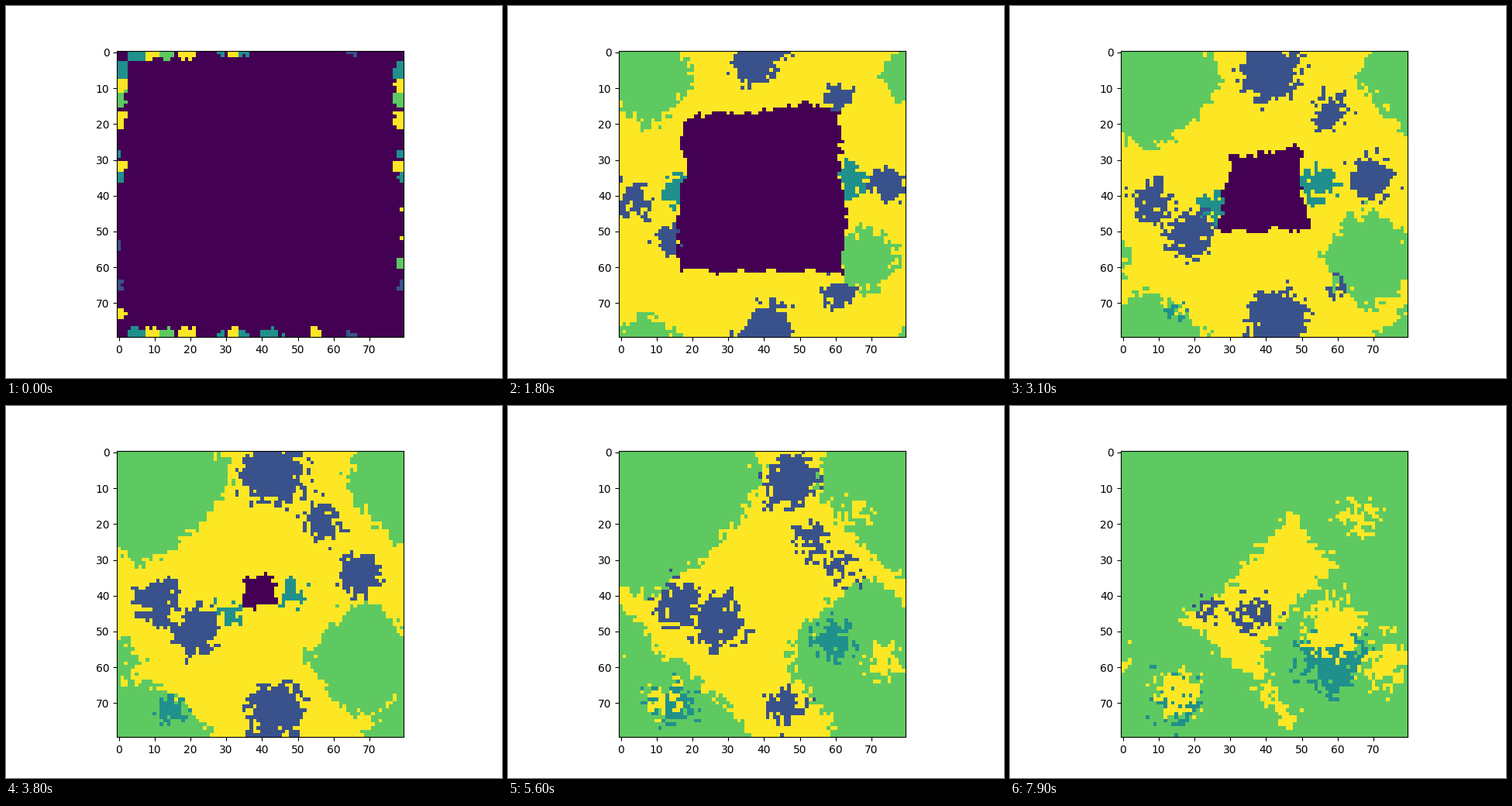
Write a matplotlib script that moves like this. It is 640 by 480 pixels and loops after 8000 ms.

```python
import numpy as np
import matplotlib.pyplot as plt
from matplotlib.animation import FuncAnimation

N, FRAMES = 80, 80
EMPTY, BLUE, TEAL, GREEN, YELLOW = range(5)
TOP, LEFT, RIGHT, BOTTOM = range(4)

rng = np.random.default_rng(7)
Y, X = np.mgrid[:N, :N]


def wrapped(d):
    """Shortest offset on a grid whose opposite edges meet."""
    return np.abs((d + N / 2) % N - N / 2)


def distance(x, y, p=2.0):
    return (wrapped(X - x) ** p + wrapped(Y - y) ** p) ** (1 / p)


def speckle():
    """White noise, slightly clumped, with unit spread."""
    w = rng.normal(size=(N, N))
    near = sum(np.roll(w, s, axis) for s in (-1, 1) for axis in (0, 1))
    n = w + 0.2 * near
    return np.clip(n / n.std(), -2.2, 2.2)


def drifting(step=6):
    """Speckle that changes slowly over the frames."""
    keys = [speckle() for _ in range(FRAMES // step + 2)]

    def at(t):
        i, u = t // step, (t % step) / step
        return ((1 - u) * keys[i] + u * keys[i + 1]) / np.hypot(u, 1 - u)
    return at


# Every side starts with the same row of colonies: colour, centre, half width.
COLONIES = [(TEAL, 5, 2), (YELLOW, 9.5, 1.5), (GREEN, 13, 2), (YELLOW, 19, 2),
            (TEAL, 28.5, 0.5), (YELLOW, 32, 1), (TEAL, 35, 1), (BLUE, 65, 1)]
STRAYS = {TOP: [],
          LEFT: [(BLUE, 54, 1), (YELLOW, 73, 1)],
          RIGHT: [(YELLOW, 44, 0), (YELLOW, 52, 0), (GREEN, 59, 1)],
          BOTTOM: [(TEAL, 42, 2), (TEAL, 46, 0.5), (YELLOW, 55, 1)]}
SPREAD = {BLUE: 1.3, TEAL: 1.1, GREEN: 0.9, YELLOW: 0.65}


def settle_border():
    """Plant the colonies; return distance to them and the nearest colour."""
    reach = np.full((N, N), np.inf)
    best = np.full((N, N), np.inf)
    owner = np.full((N, N), YELLOW)
    for side, strays in STRAYS.items():
        for color, mid, half in COLONIES + strays:
            for p in range(int(np.ceil(mid - half)), int(mid + half) + 1):
                depth = 1 + rng.integers(0, 2) + (half > 1 or color == YELLOW)
                for k in range(depth if half else 1):
                    x, y = ((p, k), (k, p), (N - 1 - k, p), (p, N - 1 - k))[side]
                    dx, dy = np.abs(X - x), np.abs(Y - y)
                    d = np.maximum(dx, dy) + 0.2 * np.minimum(dx, dy)
                    np.minimum(reach, d, out=reach)
                    owner[d * SPREAD[color] < best] = color
                    np.minimum(best, d * SPREAD[color], out=best)
    return reach, owner


# Patches that wander, swell and die: birth, death, start, end, largest radius.
PATCHES = {
    YELLOW: [(48, 100, (65, 16), (66, 20), 4),
             (40, 120, (74, 58), (73, 60), 6),
             (40, 110, (10, 71), (20, 64), 5),
             (58, 125, (60, 45), (56, 57), 9)],
    TEAL: [(8, 44, (8, 36), (36, 47), 4.5),
           (8, 43, (72, 34), (45, 39), 5),
           (26, 110, (15, 73), (14, 66), 6),
           (44, 125, (59, 50), (58, 68), 9)],
    BLUE: [(4, 74, (34, 1), (52, 11), 9),
           (4, 72, (64, 8), (49, 30), 5),
           (4, 66, (79, 38), (58, 31), 6),
           (4, 86, (0, 42), (26, 42), 6),
           (4, 95, (9, 54), (42, 43), 7),
           (4, 64, (40, 78), (47, 69), 8),
           (4, 36, (63, 70), (58, 65), 4)],
}


def patch_field(color, t):
    field = np.full((N, N), -np.inf)
    for birth, death, start, end, size in PATCHES[color]:
        u = (t - birth) / (death - birth)
        if 0 < u < 1:
            x, y = (1 - u) * np.array(start) + u * np.array(end)
            radius = size * np.sin(np.pi * u) ** 0.7
            np.maximum(field, radius - distance(x, y), out=field)
    return field


reach, owner = settle_border()
noise = [drifting() for _ in range(5)]
mixing = np.clip(10 + 2.5 * speckle(), 4, 16)
green_a = distance(7, 7, 1.3)
green_b = distance(69, 58, 1.3)


def world(t):
    green = np.maximum(5 + 0.5 * t - green_a, 3 + 0.35 * t - green_b)
    grid = np.where(green + 1.3 * noise[GREEN](t) > 0, GREEN, YELLOW)
    grain = 0.8 + t / 50
    for color in (TEAL, YELLOW, BLUE):
        grid[patch_field(color, t) + grain * noise[color](t) > 0] = color
    grid = np.where(t < mixing, owner, grid)
    ragged = 0.4 * min(1, t / 4) * noise[EMPTY](t)
    grid[reach + ragged > 0.9 * t] = EMPTY
    return grid


fig, ax = plt.subplots(figsize=(6.4, 4.8), dpi=100)
image = ax.imshow(world(0), cmap="viridis", vmin=0, vmax=4)


def update(t):
    image.set_data(world(t))
    return [image]


anim = FuncAnimation(fig, update, frames=FRAMES, interval=100,
                     repeat=True, repeat_delay=0)
plt.show()
```
